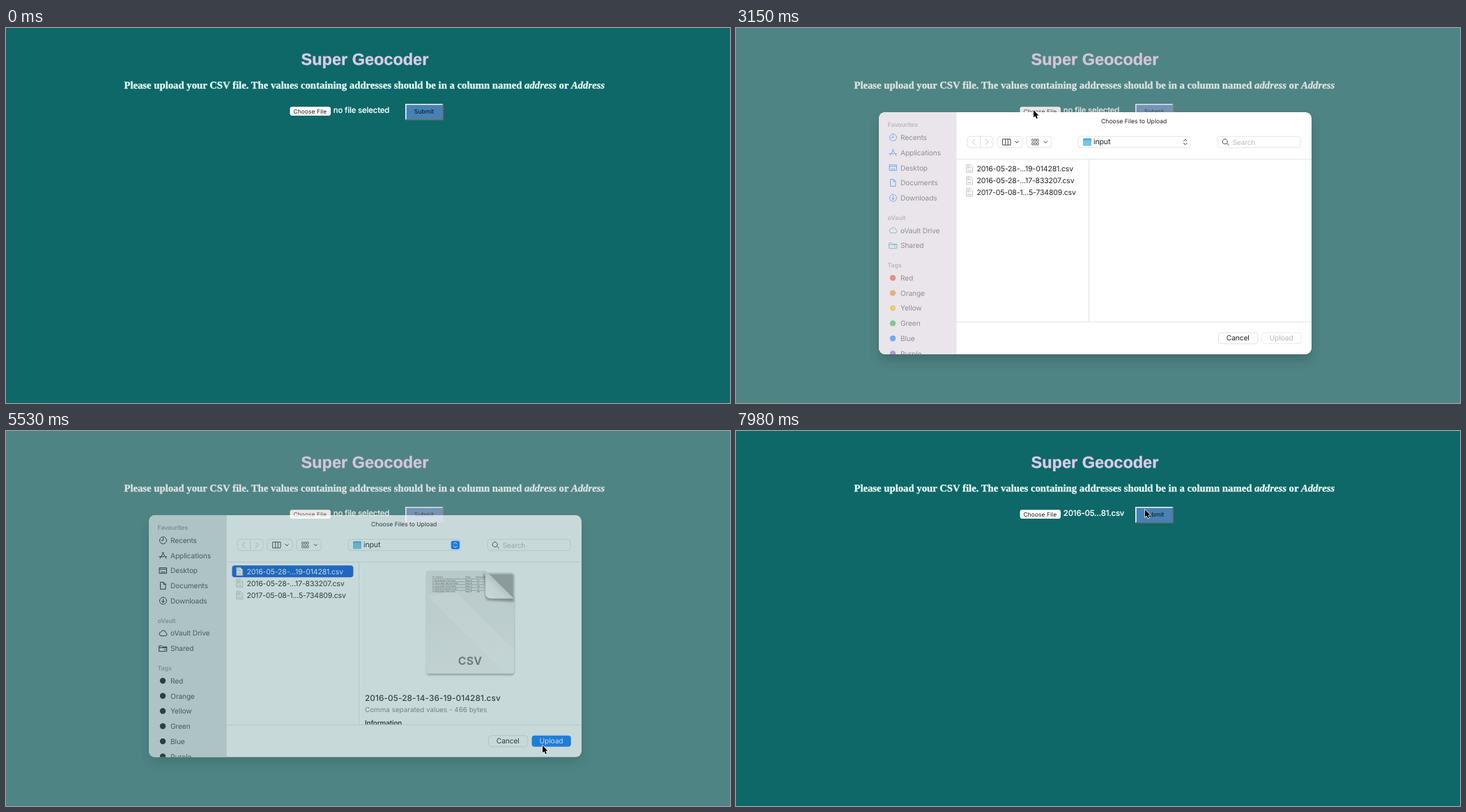
These frames come from a looping animation (1039x539 px, 8000 ms). An HTML page:

```html
<!DOCTYPE html>
<html lang="en">
<head>
<meta charset="utf-8">
<title>Super Geocoder</title>
<style>
html, body { margin: 0; width: 100%; height: 100%; overflow: hidden; background: #0e6868; }
svg { display: block; width: 1039px; height: 539px; }
text { font-family: Inter, sans-serif; white-space: pre; letter-spacing: -.015em; text-rendering: geometricPrecision; }
.line { fill: none; stroke-width: 1; stroke-linecap: round; stroke-linejoin: round; }
#title { font: bold 23.5px "Liberation Sans", Arial, sans-serif; letter-spacing: 0; stroke: #dacbe8; stroke-width: .4; }
#lead { font: bold 14.72px "Liberation Serif", Times, serif; letter-spacing: 0; stroke: #e8fcf8; stroke-width: .3; }
#fileName { stroke: #f4fbfa; stroke-width: .2; }
#side.closing .line { stroke: #1c2224; }
#side.closing circle.tag { fill: #1c2224; }
</style>
</head>
<body>
<svg id="stage" viewBox="0 0 1039 539" xmlns="http://www.w3.org/2000/svg"></svg>
<script>
const LOOP = 8000, STEP = 70;
const BLUE = '#0a7aff', TEAL = '#25aaa8';
const stage = document.getElementById('stage');

const text = (x, y, size, str, fill = '#222', more = '') =>
  `<text x="${x}" y="${y}" font-size="${size}" fill="${fill}" ${more}>${str}</text>`;
const rect = (x, y, w, h, fill, r = 0, more = '') =>
  `<rect x="${x}" y="${y}" width="${w}" height="${h}" rx="${r}" fill="${fill}" ${more}/>`;
const line = (d, color, more = '') => `<path class="line" d="${d}" stroke="${color}" ${more}/>`;
const mid = 'text-anchor="middle"';

function pageArt() {
  return rect(0, 0, 1039, 539, '#0e6868') +
    `<text id="title" x="423.5" y="53" fill="#dacbe8">Super Geocoder</text>
    <text id="lead" x="169.4" y="87" fill="#e8fcf8">Please upload your CSV file. The values containing addresses should be in a column named <tspan font-style="italic">address</tspan> or <tspan font-style="italic">Address</tspan></text>` +
    rect(407.5, 113.2, 58.5, 12.8, '#fff', 3, 'id="choose"') +
    text(412.6, 123.3, 8.4, 'Choose File', '#1c1c1c', 'style="letter-spacing:.01em"') +
    text(469.8, 122.2, 11.4, '', '#f4fbfa', 'id="fileName" font-weight="500"') +
    rect(573, 109, 54.5, 23.3, '#4682b4') +
    `<path id="bevelA" d="M573 132.3V109H627.5L625.9 110.6H574.6V130.7Z"/>
    <path id="bevelB" d="M627.5 109V132.3H573L574.6 130.7H625.9V110.6Z"/>` +
    text(600, 123.4, 8.5, 'Submit', '#0b1016', mid + ' style="letter-spacing:.01em"');
}

const icons = {
  clock: y => `M225.5 ${y - 5}a5 5 0 1 1-.1 0M225.5 ${y - 3}v3.2h-2.6`,
  apps: y => `M221 ${y + 4.5}L226.2 ${y - 4.5}M224.4 ${y - 4.5}L230 ${y + 4.5}M219.8 ${y + 1.8}h7M229 ${y + 1.8}h1.6`,
  desk: y => `M220.5 ${y - 4}h10v8h-10zM220.5 ${y - 1.8}h10M222.5 ${y + 2}h6`,
  doc: y => `M222 ${y - 5}h4l3 3v7h-7zM226 ${y - 5}v3h3`,
  down: y => `M225.5 ${y - 5}a5 5 0 1 1-.1 0M225.5 ${y - 2.5}v5m-2-2l2 2l2-2`,
  cloud: y => `M222.5 ${y + 3.8}h6.2a2.4 2.4 0 0 0 .6-4.7a3.6 3.6 0 0 0-6.8-1a2.9 2.9 0 0 0 0 5.7z`,
  share: y => `M220 ${y - 3.5}h3.5l1.2 1.3h6v6.4h-10.7zM220 ${y - 1}h10.7M227.4 ${y + 1.4}h1.6`
};

function sideArt() {
  const head = (y, s) => text(217.6, y + 3.4, 8.8, s, '#8d9799', 'font-weight="600"');
  const label = (y, s) => text(236, y + 3.8, 10.2, s, '#454c4e', 'style="letter-spacing:-.012em"');
  const item = (y, icon, s, color = BLUE) => line(icons[icon](y), color) + label(y, s);
  const tags = [['Red', '#eb4436'], ['Orange', '#e8870d'], ['Yellow', '#efb50a'],
    ['Green', '#2fb136'], ['Blue', BLUE], ['Purple', '#8a57c4']];
  return head(146, 'Favourites') + item(164.3, 'clock', 'Recents') +
    item(186, 'apps', 'Applications') + item(207.8, 'desk', 'Desktop') +
    item(229.5, 'doc', 'Documents') + item(251.2, 'down', 'Downloads') +
    head(279.7, 'oVault') + item(297.8, 'cloud', 'oVault Drive', TEAL) +
    item(319.6, 'share', 'Shared', TEAL) + head(348, 'Tags') +
    tags.map(([name, color], i) => {
      const y = 366.2 + i * 21.75;
      return `<circle class="tag" cx="225" cy="${y}" r="4.2" fill="${color}"/>` + label(y, name);
    }).join('');
}

function toolbarArt() {
  const box = (x, w) => rect(x, 162.8, w, 16.2, '#fff', 4, 'stroke="#dcdcdc" stroke-width=".8"');
  const chevron = x => line(`M${x - 2.3} 169.8l2.3 2.4l2.3-2.4`, '#333', 'stroke-width="1.3"');
  const dots = [0, 1, 2, 3, 4, 5].map(i =>
    rect(424.6 + i % 3 * 3.6, i < 3 ? 166.6 : 171.8, 2.4, 3.4, 'none', .5, 'stroke="#444" stroke-width=".8"')).join('');
  return text(571.2, 144.5, 8.6, 'Choose Files to Upload', '#222', mid + ' style="letter-spacing:0"') +
    box(332, 37) + line('M350.5 163v16', '#dcdcdc') +
    line('M343 167l-4 4l4 4M358 167l4 4l-4 4', '#c4c4c4') +
    box(375, 36) + line('M383 166.8h11v8.4h-11zM386.7 167v8M390.3 167v8', '#444') + chevron(403) +
    box(417, 35.5) + dots + chevron(444.3) +
    box(491, 161) + rect(498, 165.6, 12, 10.8, '#4ba7e0', 1.5) + rect(498, 168.2, 12, 8.2, '#74c4f0', 1.2) +
    text(513, 174.4, 10.6, 'input') +
    rect(638.6, 164.8, 12.4, 12.4, BLUE, 3, 'id="stepBox"') +
    line('M642.6 169.4l2.2-2.2l2.2 2.2M642.6 172.6l2.2 2.2l2.2-2.2', '#fff', 'id="stepMark"') +
    box(691, 119) + line('M701.7 166.6a3.6 3.6 0 1 1-.1 0M704.4 172.8l3 3', '#444', 'stroke-width="1.2"') +
    text(712.5, 174.7, 10.1, 'Search', '#b9b9b9');
}

function listArt() {
  return ['2016-05-28-...19-014281.csv', '2016-05-28-...17-833207.csv', '2017-05-08-1...5-734809.csv']
    .map((name, i) => {
      const y = 208.8 + i * 17.1;
      return (i ? '' : rect(324.4, 200.4, 174, 17, '#0a5cdb', 4, 'id="rowBar"')) +
        `<path d="M330.8 ${y - 5.5}h5.6l3.2 3.2v8.3h-8.8z" fill="#f8f8f8" stroke="#b5b5b5" stroke-width=".7"/>` +
        line(`M332.4 ${y - 3.2}h2.5M332.4 ${y - 1}h4M333 ${y + 3.4}h4.4`, '#bbb', 'stroke-width=".8"') +
        text(345.4, y + 3.9, 10.5, name, '#222', i ? '' : 'id="rowName"');
    }).join('');
}

function previewArt() {
  const cells = ['ID  Address', 'Name', 'Employees'];
  const words = ['1  Some Road, First Town', '2  Other Way, Second Town', '3  Long Lane, Third Town',
    '4  Short Row, Fourth Town', '5  Wide Walk, Fifth Town'];
  const tiny = (x, y, s) => text(x, y, 2.9, s, '#555');
  const table = cells.map((s, i) => tiny([612, 659, 674][i], 218.6, s)).join('') +
    words.map((s, i) => tiny(612, 223 + i * 4.1, s) + tiny(659, 223 + i * 4.1, 'Shop ' + 'ABCDE'[i]) +
      tiny(676, 223 + i * 4.1, 10 + i * 7)).join('') +
    line([0, 1, 2, 3, 4].map(i => `M612 ${219.8 + i * 4.1}h73`).join(''), '#aaa', 'stroke-width=".4"');
  return rect(604, 212, 125, 146, '#000', 4, 'opacity=".35" filter="url(#soft2)"') +
    '<path d="M607 208H688L729 248V352a4 4 0 0 1-4 4H607a4 4 0 0 1-4-4V212a4 4 0 0 1 4-4z" fill="url(#paper)"/>' +
    '<path d="M603 243L716 356H725a4 4 0 0 0 4-4V322L646 239z" fill="#fff" opacity=".35"/>' + table +
    '<path d="M685 211L688 246Q689 251 696 251L729 253V248z" fill="#000" opacity=".35" filter="url(#soft2)"/>' +
    '<path d="M688 208V241a7 7 0 0 0 7 7H729z" fill="url(#fold)"/>' +
    text(666, 343, 15.8, 'CSV', '#7d7d7d', mid + ' font-weight="700" style="letter-spacing:.01em"') +
    text(515, 395.3, 11.75, '2016-05-28-14-36-19-014281.csv', '#2a2a2a', 'font-weight="500" style="letter-spacing:.01em"') +
    text(515, 411, 9.85, 'Comma separated values - 466 bytes', '#858585', 'style="letter-spacing:0"') +
    text(515, 429.8, 9.8, 'Information', '#222', 'font-weight="600"');
}

function dialogArt() {
  const edge = 'stroke="#d9d9d9" stroke-width=".8"';
  return rect(205, 128, 621, 348, '#000', 10, 'id="shade" filter="url(#soft)"') +
    '<g clip-path="url(#frame)">' + rect(205, 128, 621, 348, '#fff') +
    rect(205, 128, 111.5, 348, '#d8e0e2', 0, 'id="sideBack"') +
    `<g id="side">${sideArt()}</g>` + toolbarArt() +
    line('M316.5 195.5H826M506.5 196V429M316.5 429.5H826', '#e4e4e4') + listArt() +
    `<g id="preview" clip-path="url(#pane)">${previewArt()}</g>` +
    rect(692.5, 445, 56.5, 15.8, '#fff', 4, edge) + text(720.2, 456.4, 10.3, 'Cancel', '#222', mid) +
    rect(754.5, 445, 56.3, 15.8, '#fff', 4, 'id="upBox" ' + edge) +
    text(782.5, 456.4, 10.3, 'Upload', '#fff', mid + ' id="upText"') + '</g>';
}

stage.innerHTML = `<defs>
  <clipPath id="frame"><rect x="205" y="128" width="621" height="348" rx="9"/></clipPath>
  <clipPath id="pane"><rect x="507" y="196" width="319" height="233"/></clipPath>
  <filter id="soft" x="-10%" y="-10%" width="120%" height="130%"><feGaussianBlur stdDeviation="8"/></filter>
  <filter id="soft2" x="-20%" y="-20%" width="140%" height="140%"><feGaussianBlur stdDeviation="1.8"/></filter>
  <linearGradient id="paper" x2="0" y2="1"><stop stop-color="#e9e9e9"/><stop offset="1" stop-color="#f5f5f5"/></linearGradient>
  <linearGradient id="fold" x1="0" y1="1" x2=".6" y2=".4"><stop stop-color="#fff"/><stop offset=".6" stop-color="#f4f4f4"/><stop offset="1" stop-color="#cfcfcf"/></linearGradient>
  </defs>` + pageArt() + rect(0, 0, 1039, 539, 'rgb(197,184,184)', 0, 'id="veil"') +
  `<g id="dialog">${dialogArt()}</g>
  <path id="cursor" d="M0 0V10.6L2.4 8.4 4.1 12.3 5.9 11.5 4.3 7.7H7.5Z" fill="#000" stroke="#fff" stroke-width="1.3" paint-order="stroke"/>`;

const el = {};
stage.querySelectorAll('[id]').forEach(n => { el[n.id] = n; });
const set = (id, name, value) => el[id].setAttribute(name, value);
const show = (id, on) => set(id, 'visibility', on ? 'inherit' : 'hidden');
const clamp = v => Math.min(1, Math.max(0, v));

// time, x, y, easing power towards this point (above 1 slows down)
const path = [[70, 500, 510, 1], [840, 430, 134, 1.7], [2520, 430, 134, 1], [2660, 427, 118, 1],
  [3150, 427, 118, 1], [3920, 440, 203, 1.6], [4270, 440, 203, 1], [4830, 729, 436, 1.4],
  [5110, 770, 452, 1.8], [5530, 770, 452, 1], [5670, 768, 446, 1], [5810, 610, 261, 1],
  [5950, 610, 261, 1], [6090, 558, 97, 1], [6230, 558, 97, 1], [6720, 587, 113, 1.6]];

function cursorAt(t) {
  const i = path.findIndex(k => k[0] > t);
  if (i < 0) return path[path.length - 1].slice(1, 3);
  if (!i) return path[0].slice(1, 3);
  const a = path[i - 1], b = path[i];
  const u = 1 - Math.pow(1 - (t - a[0]) / (b[0] - a[0]), b[3]);
  return [a[1] + (b[1] - a[1]) * u, a[2] + (b[2] - a[2]) * u];
}

function draw(time) {
  const t = Math.floor(time / STEP) * STEP;
  const during = (from, to) => t >= from && t < to;
  const closing = t >= 5460;
  const open = closing ? clamp((5685 - t) / 242)
    : t < 3080 ? 0 : 1 - Math.pow(1 - clamp((t - 3045) / 260), 2);
  const ready = t >= 3290, picked = t >= 4130;

  set('choose', 'fill', during(2660, 2800) ? '#dcdcdc' : '#fff');
  el.fileName.textContent = t < 5740 ? 'no file selected' : '2016-05...81.csv';
  const down = during(6720, 6860);
  set('bevelA', 'fill', down ? '#726c78' : '#f2f6fa');
  set('bevelB', 'fill', down ? '#f2f6fa' : '#726c78');

  set('veil', 'opacity', .55 * open);
  show('dialog', open > 0);
  set('dialog', 'opacity', closing ? Math.min(1, open * 1.08) : Math.min(1, open * 1.6));
  set('dialog', 'transform', `translate(0 ${-27 * Math.pow(1 - open, 1.3)})`);
  set('shade', 'opacity', .25 * open);
  set('shade', 'transform', `translate(0 ${14 * open})`);
  set('sideBack', 'fill', ready ? '#d8e0e2' : '#e9e5eb');
  set('side', 'opacity', ready ? 1 : .55);
  el.side.classList.toggle('closing', closing);
  show('stepBox', ready);
  set('stepMark', 'stroke', ready ? '#fff' : '#222');

  show('rowBar', picked);
  set('rowName', 'fill', picked ? '#fff' : '#222');
  show('preview', picked);
  set('upBox', 'fill', !picked ? '#fff' : during(5180, 5320) ? '#0864d6' : BLUE);
  set('upBox', 'stroke', picked ? 'none' : '#e4e4e4');
  set('upText', 'fill', picked ? '#fff' : '#b8b8b8');

  show('cursor', t >= 70);
  set('cursor', 'transform', `translate(${cursorAt(t)})`);
}

const begin = performance.now();
function tick() {
  draw((performance.now() - begin) % LOOP);
  requestAnimationFrame(tick);
}
tick();
</script>
</body>
</html>
```
